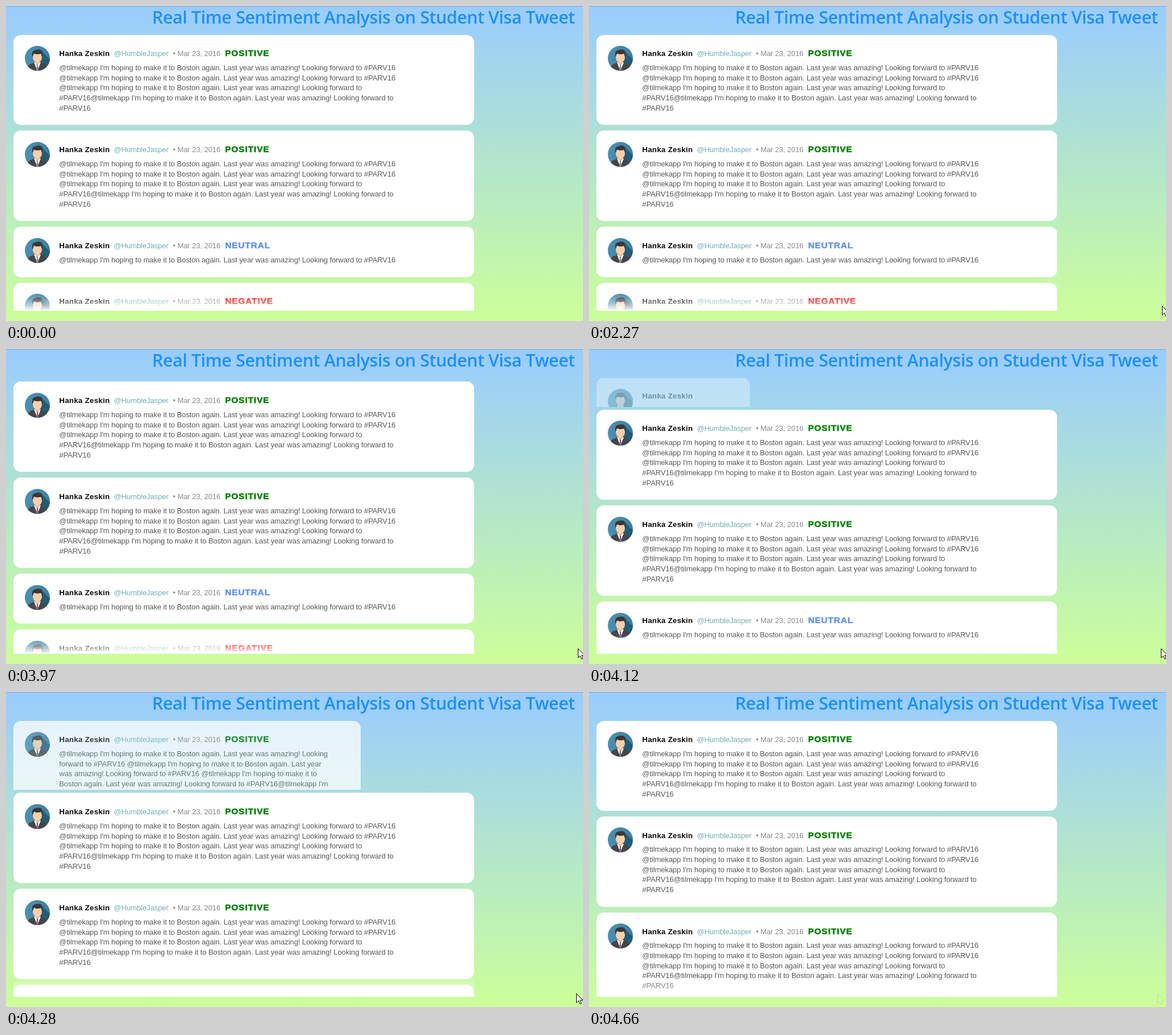
An HTML page that plays this animation: 1012 by 554 pixels, repeating every 8 s.

```html
<!DOCTYPE html>
<html lang="en">
<head>
<meta charset="utf-8">
<title>Real Time Sentiment Analysis</title>
<style>
html, body { margin: 0; width: 100%; height: 100%; overflow: hidden; }
body {
  position: relative;
  background: linear-gradient(#9cf, #cf9);
  font: 13px/17.65px "Liberation Sans", Arial, sans-serif;
  letter-spacing: -.1px;
  color: #5a5a5a;
}
body::before { content: ""; position: absolute; width: 100%; height: 1px; background: #80a9dc; }
h1 {
  position: absolute; left: 627px; top: 0; margin: 0;
  transform: translateX(-50%);
  white-space: nowrap;
  font: 600 30.3px/40px "Open Sans", "Noto Sans", sans-serif;
  letter-spacing: -.4px;
  color: #1e90ff;
}
#feed { position: absolute; left: 13px; top: 45.5px; width: 808px; height: 490.5px; overflow: hidden; }
#feed::after {
  content: ""; position: absolute; left: 0; bottom: 0; width: 100%; height: 34px;
  background: linear-gradient(rgba(255,255,255,0), 62%, #fff);
}
.item { display: flow-root; overflow: hidden; }
.card {
  position: relative; box-sizing: border-box; margin: 5px 0;
  padding: 20.8px 45px 21px 80.3px;
  border-radius: 13px; background: #fff;
}
.card svg {
  position: absolute; left: 19.7px; top: 19.5px; width: 44px; height: 44px;
  border-radius: 50%; background: linear-gradient(100deg, #4c92b5, #3a7c9c);
}
.head { line-height: 24.2px; margin-bottom: 3.6px; }
.head span { white-space: nowrap; }
.name { font-weight: bold; font-size: 13.3px; letter-spacing: .25px; color: #0c0c0c; }
.handle { margin: 0 4.3px 0 3.7px; color: #70afb6; }
.date { margin-right: 1.5px; color: #8b8b8b; }
.label { margin-left: 3px; font-weight: 900; font-size: 15.2px; letter-spacing: 1px; -webkit-text-stroke: .6px; }
.positive { color: #008000; }
.neutral { color: #6495ed; }
.negative { color: #f00; }
.card p { margin: 0; max-width: 610px; }
.tie { fill: var(--tie); }
#cursor { position: absolute; left: 0; top: 0; width: 13px; height: 20px; overflow: visible; }
</style>
</head>
<body>
<h1>Real Time Sentiment Analysis on Student Visa Tweet</h1>
<div id="feed"></div>
<svg id="cursor"><path d="M.5 .5V16.5L4.2 13 6.8 18.8 9.2 17.7 6.7 12H11.8Z" fill="#fff" stroke="#000"/></svg>
<script>
const LOOP = 8000, ITEM_HEIGHT = 168.4, FEED_WIDTH = 808;
const SLIDE_START = 3895, SLIDE_TIME = 575;
const SLIDE_STEPS = [3970, 4050, 4120, 4200, 4280, 4340, 4420, 4500];

// time, x, y of the pointer tip; each place holds until the next
const POINTER = [
  [940, 993, 550], [1010, 997, 546], [1090, 1000, 543], [1170, 1002, 541],
  [2100, 1003, 536], [2180, 1004, 531], [2270, 1005, 527], [3360, 1004, 527],
  [3520, 1003, 526.5], [4200, 1002, 527], [4280, 1000, 530], [4340, 998, 535],
  [4420, 997, 534], [4500, 997, 532], [4580, 997, 531]
];
const POINTER_GONE = 4660;

const sentence = "@tilmekapp I'm hoping to make it to Boston again. Last year was amazing! Looking forward to #PARV16";
const longText = `${sentence} ${sentence} ${sentence}${sentence}`;

const avatar = `<svg viewBox="0 0 44 44">
  <path d="M29 9L44 24V44H22Z" fill="#255b73"/>
  <path d="M3 44Q4 33 13 31L18 28H26L31 31Q40 33 41 44Z" fill="#474546"/>
  <path d="M16 29L22 44 28 29Z" fill="#fff"/>
  <path d="M18 24H26V30L22 34 18 30Z" fill="#efb58e"/>
  <path class="tie" d="M20.5 33H23.5L23 36 24.5 44H19.5L21 36Z"/>
  <ellipse cx="22" cy="20" rx="8" ry="10" fill="#fbcfa9"/>
  <path d="M13.5 20Q11 8 19 7.5 30 4 31 13L30.3 20 28.5 14Q20 16 16 13.5Z" fill="#3b3736"/>
</svg>`;

function tweet(label, text) {
  const item = document.createElement("div");
  item.className = "item";
  item.innerHTML = `<div class="card">${avatar}
    <div class="head"><span class="name">Hanka Zeskin</span>
      <span class="handle">@HumbleJasper</span>
      <span class="date">• Mar 23, 2016</span>
      <span class="label ${label}">${label.toUpperCase()}</span></div>
    <p>${text}</p></div>`;
  feed.append(item);
  return item;
}

const feed = document.getElementById("feed");
const cursor = document.getElementById("cursor");
const incoming = tweet("positive", longText);
tweet("positive", longText);
tweet("positive", longText);
tweet("neutral", sentence);
tweet("negative", sentence);

const swing = x => .5 - Math.cos(Math.PI * Math.min(1, x)) / 2;

function drawFeed(t) {
  const step = SLIDE_STEPS.findLast(s => s <= t);
  const shown = step ? swing((step - SLIDE_START) / SLIDE_TIME) : 0;
  Object.assign(incoming.style, {
    display: shown ? "" : "none",
    height: ITEM_HEIGHT * shown + "px",
    width: FEED_WIDTH * shown + "px",
    opacity: shown
  });
  feed.style.setProperty("--tie", step ? "#80609a" : "#878b96");
}

function drawCursor(t) {
  const place = POINTER.findLast(([time]) => time <= t);
  cursor.style.display = place ? "" : "none";
  if (!place) return;
  cursor.style.opacity = t < POINTER_GONE ? 1 : .12;
  cursor.style.transform = `translate(${place[1]}px, ${place[2]}px)`;
}

function frame() {
  const t = performance.now() % LOOP;
  drawFeed(t);
  drawCursor(t);
  requestAnimationFrame(frame);
}
frame();
</script>
</body>
</html>
```
